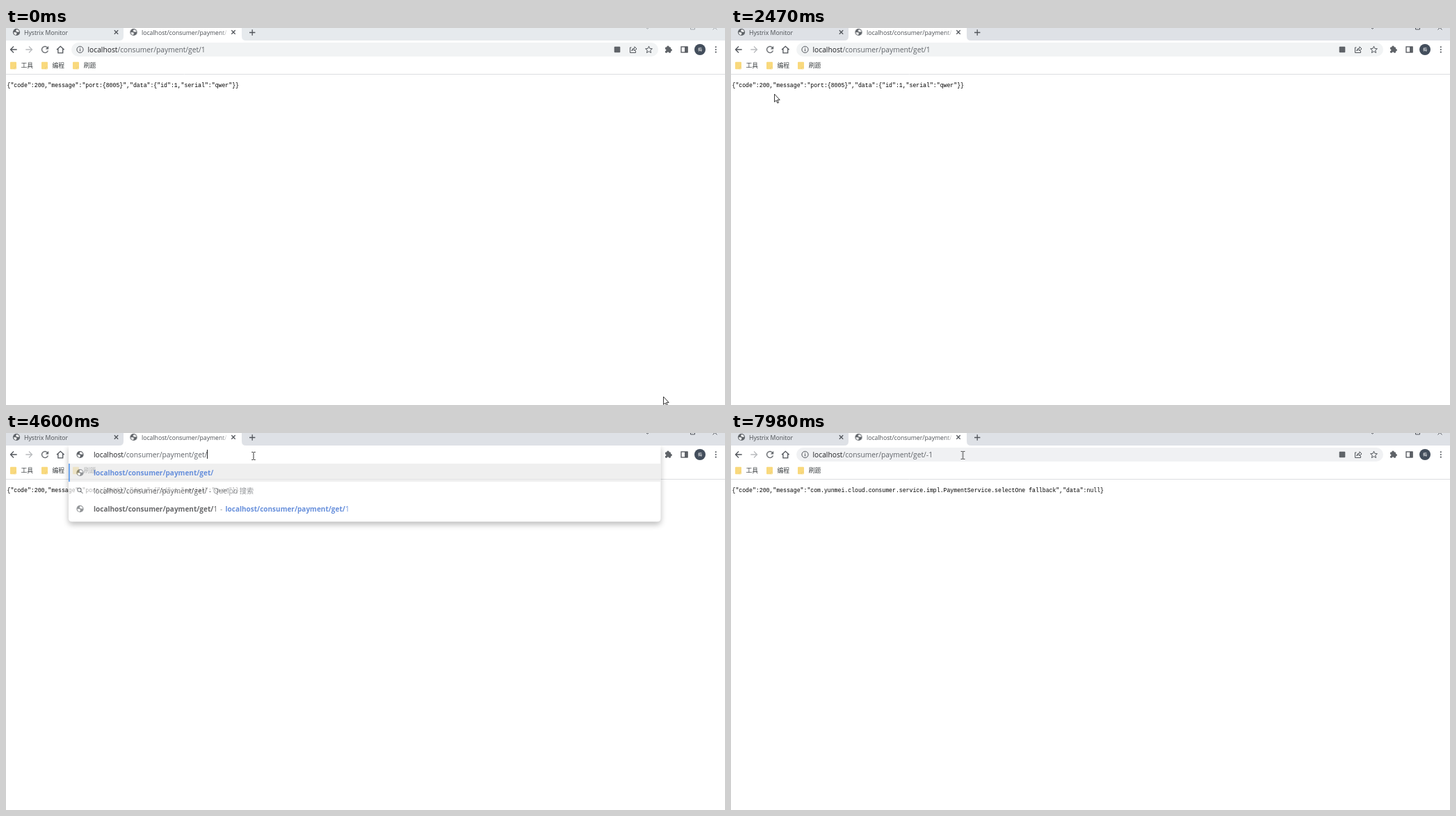
Animation, 1034 px wide and 542 px high, one loop 8 s. Source, as an HTML page:

```html
<!DOCTYPE html>
<html lang="zh">
<head>
<meta charset="utf-8">
<title>Browser demo</title>
<style>
html, body { margin: 0; width: 100%; height: 100%; overflow: hidden; background: #fff; }
svg { display: block; width: 1034px; height: 542px; }
text { font: 10.25px "Open Sans", "Noto Sans", "Noto Sans CJK SC", "Noto Sans CJK", sans-serif; fill: #5f6368; white-space: pre; }
.tab { font-size: 8.7px; fill: #4a4e53; }
.mark { font-size: 8.8px; fill: #3c4043; }
.json { font: 8.19px "Liberation Mono", monospace; fill: #000; }
.dark { fill: #202124; }
.bold { font-weight: 700; font-size: 10px; }
.link { fill: #1f5bcb; }
.line { fill: none; stroke: #50545a; stroke-width: 1.3; }
.gray { fill: #5f6368; }

/* one 8 s clock: 1% = 80 ms */
.key { animation: 8s step-end infinite; }
.strip { animation-name: strip; }
.ctrl { animation-name: ctrl; }
.busy { animation-name: busy; }
.idle { animation-name: idle; }
.spin { animation: spin .7s linear infinite; transform-origin: 183px 6px; }
.hover { animation: hover 8s linear infinite; }
.chip { animation: chip 8s linear infinite; }
.field { animation-name: field; }
.bar { animation-name: bar; }
.first { animation-name: first; }
.second { animation-name: second; }
.focus { animation-name: focus; }
.select { animation-name: select; }
.caret0 { animation-name: caret0; }
.caret { animation-name: caret; }
.popup { animation-name: popup; }
.rows { animation: rows 8s linear infinite; }
.typeA { animation-name: typeA; }
.typeB { animation-name: typeB; }
.typeC { animation-name: typeC; }
.before { animation-name: before; }
.after { animation-name: after; }
.arrow { animation-name: arrow; }
.beam { animation-name: beam; }
.click { animation-name: click; }
.mouse { animation: mouse 8s ease-in-out infinite; }

@keyframes strip { 0% { fill: #e6eaed } 21% { fill: #dee1e6 } }
@keyframes ctrl { 0% { opacity: .45 } 21% { opacity: 1 } }
@keyframes busy { 0%, 25.5%, 37%, 98% { opacity: 0 } 23.75%, 35.25%, 95.6% { opacity: 1 } }
@keyframes idle { 0%, 25.5%, 37%, 98% { opacity: 1 } 23.75%, 35.25%, 95.6% { opacity: 0 } }
@keyframes spin { to { transform: rotate(360deg) } }
@keyframes hover { 0%, 21%, 27.5%, 32.6%, 41.8%, 100% { opacity: 0 } 22.5%, 25.5%, 34%, 39.5% { opacity: 1 } }
@keyframes chip { 0%, 37.2%, 41.4%, 100% { opacity: 0 } 38.2%, 39.8% { opacity: 1 } }
@keyframes field { 0% { fill: #f1f3f4 } 37.4% { fill: #ecedef } 95.4% { fill: #f0f1f3 } }
@keyframes bar { 0%, 95.4% { opacity: 1 } 57% { opacity: 0 } }
@keyframes first { 0% { opacity: 1 } 57% { opacity: 0 } }
@keyframes second { 0% { opacity: 0 } 95.4% { opacity: 1 } }
@keyframes focus { 0%, 57% { opacity: 0 } 44.6% { opacity: 1 } }
@keyframes select { 0%, 46.9% { opacity: 0 } 44.6% { opacity: 1 } }
@keyframes caret0 { 0%, 54.25% { opacity: 0 } 47% { opacity: 1 } }
@keyframes caret { 0%, 74.7%, 86.8% { opacity: 1 } 68.6%, 80.75%, 92.85% { opacity: 0 } }
@keyframes popup { 0%, 95.4% { opacity: 0 } 57% { opacity: 1 } }
@keyframes rows { 0%, 56.9% { opacity: 0 } 57.8%, 100% { opacity: 1 } }
@keyframes typeA { 0%, 59.4% { opacity: 0 } 57% { opacity: 1 } }
@keyframes typeB { 0%, 62% { opacity: 0 } 59.4% { opacity: 1 } }
@keyframes typeC { 0%, 95.4% { opacity: 0 } 62% { opacity: 1 } }
@keyframes before { 0% { opacity: 1 } 97.5% { opacity: 0 } }
@keyframes after { 0% { opacity: 0 } 97.5% { opacity: 1 } }
@keyframes arrow { 0%, 73.2% { opacity: 1 } 37.4%, 76.4% { opacity: 0 } }
@keyframes beam { 0%, 73.2% { opacity: 0 } 37.4%, 76.4% { opacity: 1 } }
@keyframes click { 0%, 23.75%, 35.6%, 44.6%, 49% { opacity: 0 } 21.1%, 34.4%, 43.3%, 46.8% { opacity: 1 } }
@keyframes mouse {
  0%, .25% { transform: translate(945px, 530px) }
  10.2% { transform: translate(66px, 71px) }
  12.5% { transform: translate(74px, 67px) }
  18% { transform: translate(50px, 28px) }
  20.4%, 25% { transform: translate(53px, 31px) }
  30.1%, 30.8% { transform: translate(62px, 95px) }
  34%, 36% { transform: translate(54px, 32px); animation-timing-function: ease-in }
  38.9% { transform: translate(220px, 40px); animation-timing-function: ease-out }
  42.5% { transform: translate(350px, 34px) }
  44%, 48.7% { transform: translate(358px, 32.5px) }
  49.2%, 71.7% { transform: translate(356px, 33px); animation-timing-function: ease-in }
  74% { transform: translate(124px, 42px); animation-timing-function: ease-out }
  75.3% { transform: translate(86px, 40px) }
  78.5% { transform: translate(210px, 24px) }
  81.4%, 82.5% { transform: translate(296px, 37px) }
  86.7%, 100% { transform: translate(333.5px, 32px) }
}
</style>
</head>
<body>
<svg viewBox="0 0 1034 542">
  <defs>
    <g id="globe"><circle class="gray" r="5.1"/><path d="M-4.1.3H-1Q.6.6.4 2L-.7 4.2Q-3.7 3.3-4.1.3ZM.2-3.9 2.9-3 4.1-.5 1.4-.2-.9-1.4Z" fill="#fff"/></g>
    <path id="cross" d="M-2.7-2.7 2.7 2.7M-2.7 2.7 2.7-2.7"/>
    <path id="back" d="M5 0H-4M.3-4.5-4.2 0 .3 4.5"/>
    <g id="folder"><rect width="9" height="10.5" rx="1" fill="#f9d97d"/><path d="M6.2 10.5V8H9" fill="#fff1c2" stroke="#e5bd55" stroke-width=".6"/></g>
    <linearGradient id="fade"><stop offset="0" stop-color="#fff" stop-opacity="0"/><stop offset="1" stop-color="#fff"/></linearGradient>
    <clipPath id="below"><rect y="18" width="1034" height="524"/></clipPath>
  </defs>

  <!-- page -->
  <text class="json key before" x="1.5" y="84.5">{"code":200,"message":"port:{8005}","data":{"id":1,"serial":"qwer"}}</text>
  <text class="json key after" x="1.5" y="84.5">{"code":200,"message":"com.yunmei.cloud.consumer.service.impl.PaymentService.selectOne fallback","data":null}</text>

  <!-- tabs -->
  <rect class="key strip" width="1034" height="18"/>
  <path d="M163 18Q169 18 169 12V0H339V12Q339 18 345 18Z" fill="#fff"/>
  <use href="#globe" x="15" y="6"/>
  <text class="tab" x="26" y="9.7">Hystrix Monitor</text>
  <use href="#globe" class="key idle" x="183.5" y="6"/>
  <g class="key busy"><path class="spin line" style="stroke:#1a73e8" d="M183 1.5A4.5 4.5 0 1 1 178.5 6"/></g>
  <text class="tab" x="195" y="9.7">localhost/consumer/payment/</text>
  <rect x="309" width="10" height="16" fill="url(#fade)"/>
  <g class="line"><use href="#cross" x="158.5" y="6"/><use href="#cross" x="327" y="6"/><path d="M350 6.5H358.4M354.2 2.3V10.7"/></g>
  <g class="line key ctrl" style="stroke-width:1"><path d="M921 0 922.5 1.2 924 0M984.5 0V2H990.5V0M1016.5 2.5 1019.5-.5 1022.5 2.5"/></g>

  <!-- toolbar -->
  <path d="M0 66.5H1034" stroke="#dcdee1"/>
  <circle class="hover" cx="56" cy="31" r="9" fill="#e2e4e7"/>
  <use href="#back" class="line" x="10.7" y="31"/>
  <use href="#back" class="line" style="stroke:#b9bbbe" transform="matrix(-1 0 0 1 33.3 31)"/>
  <path class="gray key idle" transform="translate(56 31) scale(.64) translate(-12 -12)" d="M17.65 6.35C16.2 4.9 14.21 4 12 4c-4.42 0-8 3.58-8 8s3.57 8 8 8c3.73 0 6.84-2.55 7.73-6h-2.08c-.82 2.33-3.04 4-5.65 4-3.31 0-6-2.69-6-6s2.69-6 6-6c1.66 0 3.14.69 4.22 1.78L13 11h7V4z"/>
  <g class="key busy"><use href="#cross" class="line" transform="translate(56 31) scale(1.4)"/></g>
  <path class="line" d="M73 31.2 78.3 26.3 83.6 31.2M74.9 30V35.8H81.7V30"/>
  <use href="#folder" x="6" y="48.7"/><text class="mark" x="21.5" y="57.3">工具</text>
  <use href="#folder" x="51" y="48.7"/><text class="mark" x="66.5" y="57.3">编程</text>
  <use href="#folder" x="96" y="48.7"/><text class="mark" x="111.7" y="57.3">刷题</text>
  <g class="gray">
    <rect x="948" y="27.5" width="8" height="8.3" rx="1"/><circle cx="952" cy="27.3" r="1.7"/><circle cx="956.2" cy="31.7" r="1.7"/>
    <circle cx="948" cy="31.8" r="1.4" fill="#fff"/><circle cx="952" cy="35.8" r="1.4" fill="#fff"/>
    <rect x="976" y="27" width="4.3" height="8"/>
    <circle cx="1020.8" cy="27.3" r="1.1"/><circle cx="1020.8" cy="31" r="1.1"/><circle cx="1020.8" cy="34.7" r="1.1"/>
  </g>
  <rect class="line" x="971" y="27" width="9" height="8"/>
  <circle cx="998" cy="31" r="8" fill="#434e5c"/>
  <text x="998" y="33.3" text-anchor="middle" style="font-size:6px;fill:#fff">梅</text>

  <!-- address bar -->
  <g class="key bar">
    <rect class="key field" x="94" y="21" width="844" height="20" rx="10"/>
    <rect class="chip" x="868" y="22.5" width="22" height="17" rx="8.5" fill="#d9dbdf"/>
    <rect class="key focus" x="94" y="21.5" width="843" height="19" rx="9.5" fill="#fff" stroke="#1a6fe0" stroke-width="1.7"/>
    <circle class="line" cx="106.5" cy="31" r="4.6" style="stroke-width:1"/>
    <path class="line" style="stroke-width:1.1" d="M106.5 30.3V33.6M106.5 28.2V29.3"/>
    <rect class="gray" x="874.7" y="26.7" width="8.6" height="8.6" rx="1"/>
    <g class="line" style="stroke-width:1">
      <path d="M899.5 28H897.5V35.5H905.5V33M899.7 33Q900.2 29 904 29V26.8L907 30 904 33V31Q901.3 31 899.7 33"/>
      <path d="M924.5 26.2 925.9 29.5 929.4 29.8 926.7 32.1 927.6 35.6 924.5 33.7 921.4 35.6 922.3 32.1 919.6 29.8 923.1 29.5Z"/>
    </g>
    <text class="key first" x="117.5" y="34.5"><tspan class="dark">localhost</tspan>/consumer/payment/get/1</text>
    <text class="key second" x="117.5" y="34.5"><tspan class="dark">localhost</tspan>/consumer/payment/get/-1</text>
    <g class="key select"><rect x="117.5" y="24" width="169.5" height="13.5" fill="#1a73e8"/><text x="117.5" y="34.5" style="fill:#fff">localhost/consumer/payment/get/1</text></g>
    <rect class="key caret0" x="287" y="24" width="1" height="13" fill="#202124"/>
  </g>

  <g id="popup" class="key popup" clip-path="url(#below)"></g>

  <g class="mouse">
    <circle class="key click" cx=".5" cy=".8" r="8.5" fill="#f7ee1c" fill-opacity=".72"/>
    <path class="key arrow" d="M.5 0V11.3L3 9 4.9 13 6.5 12.3 4.7 8.4H8.2Z" fill="#fff" stroke="#222" stroke-width=".9"/>
    <path class="key beam" d="M-2.7-5.5H-.5M.5-5.5H2.7M0-5V5M-2.7 5.5H-.5M.5 5.5H2.7" stroke="#333"/>
  </g>
</svg>
<script>
const PATH = 'localhost/consumer/payment/get/';
const label = (y, html, x = 126, cls = '') => `<text class="${cls}" x="${x}" y="${y}">${html}</text>`;
const globe = y => `<use href="#globe" x="106.5" y="${y}"/>`;

// Address field with its suggestion list for one stage of typing.
function stage(name, typed, caretX, history) {
  const bottom = history ? 127.5 : 101.5;
  const blink = name === 'typeC' ? 'key caret' : '';
  const past = `${PATH}<tspan style="font-weight:400">1</tspan>`;
  return `<g class="key ${name}">
    <rect x="90" y="18" width="851.5" height="26" fill="#fff"/>
    <g class="rows">
      <path d="M90 18H941.5V${bottom - 5}q0 5-5 5H95q-5 0-5-5Z" fill="#fff" style="filter:drop-shadow(0 4px 4px rgba(0,0,0,.4))"/>
      <rect x="90" y="44" width="851.5" height="26" fill="#e7e7e8"/>
      <rect x="90" y="44" width="1.8" height="26" fill="#1a73e8"/>
      ${globe(57)}${label(60.7, PATH + typed, 126, 'bold link')}
      <g class="line" style="stroke-width:1.1"><circle cx="105.5" cy="81.8" r="2.7"/><path d="M107.5 83.8 110.5 86.8"/></g>
      ${label(86.7, `<tspan class="dark">${PATH}</tspan>${typed} - Quelpo 搜索`)}
      ${history ? globe(109) + label(112.7, past, 126, 'bold dark') + label(112.7, '-', 308) + label(112.7, past, 315.5, 'bold link') : ''}
    </g>
    ${globe(31)}${label(34.5, `<tspan class="dark">localhost</tspan>${PATH.slice(9)}${typed}`)}
    <rect class="${blink}" x="${caretX}" y="24" width="1" height="13" fill="#202124"/>
  </g>`;
}

document.getElementById('popup').innerHTML =
  stage('typeA', '', 289, true) + stage('typeB', '-', 293, false) + stage('typeC', '-1', 299, false);
</script>
</body>
</html>
```
